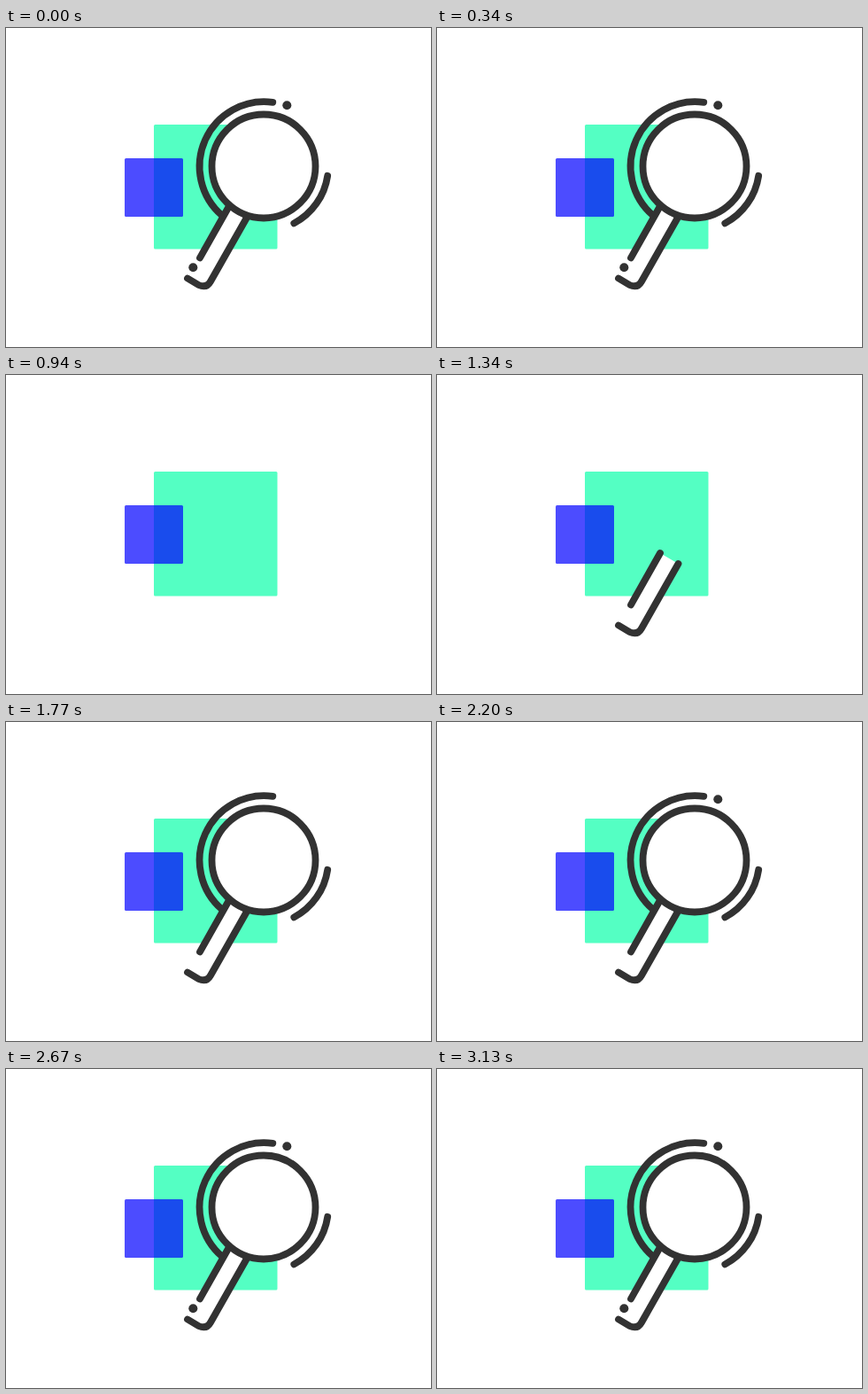
These frames come from a looping animation (480 by 360 pixels, 3440 ms). An HTML page:

```html
<!DOCTYPE html>
<html lang="en">
<head>
<meta charset="utf-8">
<title>Magnifying glass</title>
<style>
  html, body { margin: 0; width: 100%; height: 100%; overflow: hidden; background: #fff; }
  svg { display: block; width: 100%; height: 100%; }
  .ink { stroke: #323232; stroke-width: 7.8; stroke-linecap: round; stroke-linejoin: round; fill: none; }
  .dot { fill: #323232; }
</style>
</head>
<body>
<svg viewBox="0 0 480 360">
  <rect x="167" y="109" width="139.5" height="140.5" rx="1.5" fill="#54ffc3"/>
  <rect data-from="940" x="134" y="147" width="66" height="66" rx="1.5" fill="#00f" fill-opacity=".7"/>
  <g data-from="1340">
    <path d="M252 201 L272.5 213 L231 286 Q226.500 294 217.500 290 L205 282.500Z" fill="#fff"/>
    <path class="ink" d="M252 201 L219 259.300 M272.500 213 L231 286 Q226.500 294 217.500 290 L205 282.500"/>
  </g>
  <g data-from="1770" class="ink">
    <circle cx="291" cy="156" r="58.5" fill="#fff"/>
    <path d="M301.300 83.800 A73 73 0 0 0 244 211.500 M363.200 166.800 A73 73 0 0 1 325.300 220.400"/>
  </g>
  <circle data-from="2200" class="dot" cx="317.3" cy="87.2" r="5"/>
  <circle data-from="2670" class="dot" cx="211.3" cy="270.3" r="5"/>
</svg>
<script>
  const LOOP = 3440;
  const HOLD = 570; // the finished picture stays this long into each loop
  const parts = document.querySelectorAll('[data-from]');

  function draw() {
    const time = performance.now() % LOOP;
    for (const part of parts) {
      const visible = time < HOLD || time >= Number(part.dataset.from);
      part.style.visibility = visible ? 'visible' : 'hidden';
    }
    requestAnimationFrame(draw);
  }
  draw();
</script>
</body>
</html>
```
